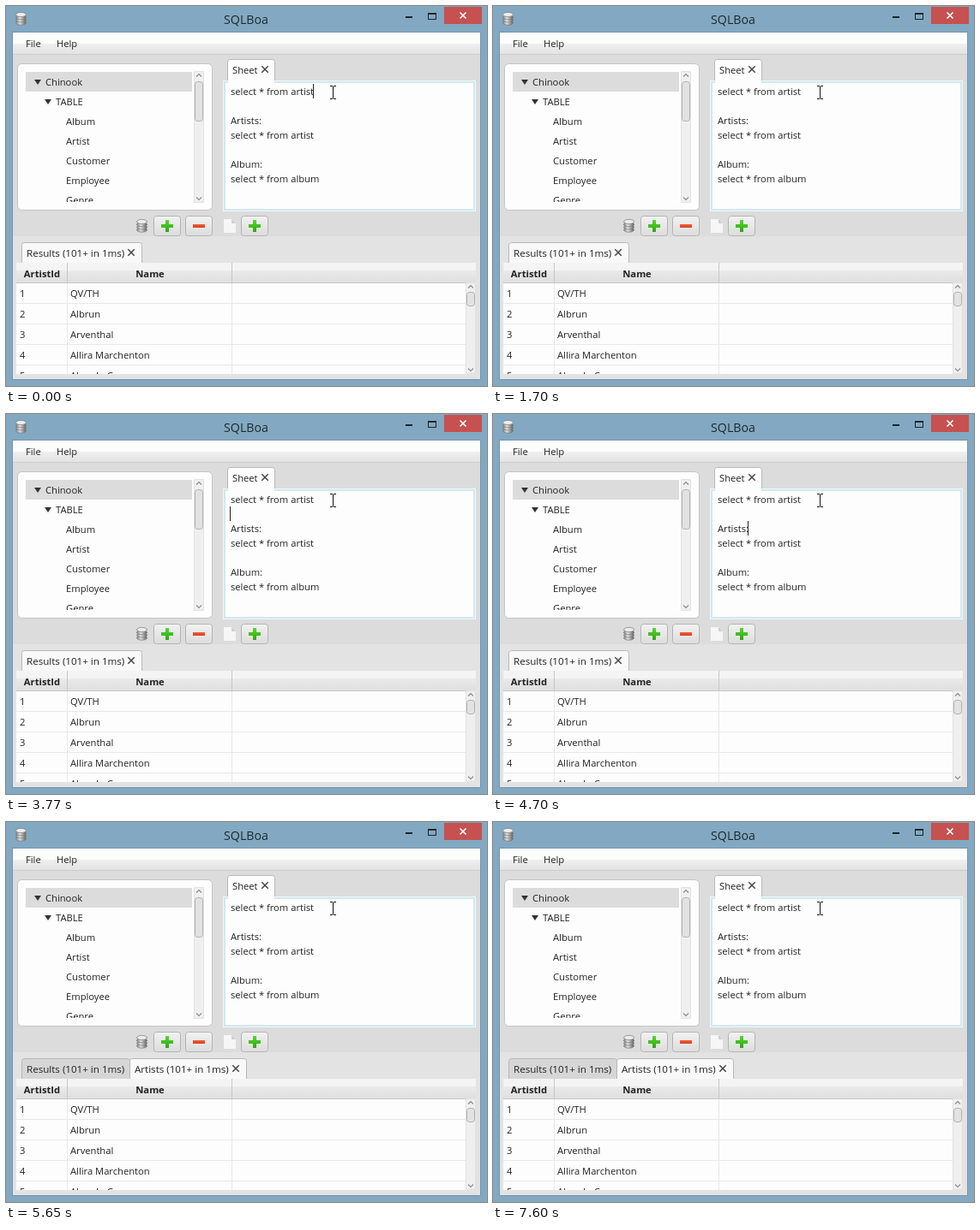
These frames come from a looping animation (561 px wide and 444 px high, 8000 ms). An HTML page with a canvas:

```html
<!DOCTYPE html>
<html lang="en">
<head>
<meta charset="utf-8">
<title>SQLBoa</title>
<style>
html, body { margin: 0; width: 100%; height: 100%; overflow: hidden; background: #82a9c1; }
canvas { display: block; }
</style>
</head>
<body>
<canvas id="stage" width="561" height="444"></canvas>
<script>
const ctx = document.getElementById('stage').getContext('2d');
const LOOP = 8000;
const FONT = '"Open Sans", "Noto Sans", sans-serif';
const INK = '#222';
const FRAME = '#82a9c1';

// Caret visibility: [start, end, x, line]
const carets = [
  [0, 280, 358, 0], [680, 1000, 358, 0], [1140, 1700, 358, 0],
  [2130, 2630, 358, 0], [2750, 3180, 358, 0], [3770, 4170, 261, 1],
  [4700, 5650, 297, 2], [6110, 6360, 358, 3], [6360, 6610, 261, 4],
  [7200, 7600, 298, 5]
];
const BUSY = [1000, 1140];
const TAB_OPENS = 5250, TAB_READY = 5370;

const sheet = ['select * from artist', '', 'Artists:', 'select * from artist', '', 'Album:', 'select * from album'];
const tables = ['Album', 'Artist', 'Customer', 'Employee', 'Genre'];
const artists = ['QV/TH', 'Albrun', 'Arventhal', 'Allira Marchenton', 'Almo In Currens'];

function rect(x, y, w, h, fill) {
  ctx.fillStyle = fill;
  ctx.fillRect(x, y, w, h);
}

function fade(y, h, ...colors) {
  const g = ctx.createLinearGradient(0, y, 0, y + h);
  colors.forEach((c, i) => g.addColorStop(i / (colors.length - 1), c));
  return g;
}

function panel(x, y, w, h, radii, fill, border) {
  ctx.beginPath();
  ctx.roundRect(x + .5, y + .5, w - 1, h - 1, radii);
  ctx.fillStyle = fill;
  ctx.fill();
  ctx.strokeStyle = border;
  ctx.lineWidth = 1;
  ctx.stroke();
}

function text(s, x, y, { size = 11.2, weight = 400, align = 'left', color = INK } = {}) {
  ctx.font = `${weight} ${size}px ${FONT}`;
  ctx.textAlign = align;
  ctx.fillStyle = color;
  ctx.fillText(s, x, y);
}

function path(points, color, width) {
  ctx.beginPath();
  points.forEach(([x, y]) => ctx.lineTo(x, y));
  if (width) {
    ctx.strokeStyle = color;
    ctx.lineWidth = width;
    ctx.stroke();
  } else {
    ctx.fillStyle = color;
    ctx.fill();
  }
}

function cross(x, y, r, color, width) {
  path([[x - r, y - r], [x + r, y + r]], color, width);
  path([[x + r, y - r], [x - r, y + r]], color, width);
}

function clipped(x, y, w, h, draw) {
  ctx.save();
  ctx.beginPath();
  ctx.rect(x, y, w, h);
  ctx.clip();
  draw();
  ctx.restore();
}

function chevron(x, y, dir) {
  path([[x - 3, y + 1.5 * dir], [x, y - 1.5 * dir], [x + 3, y + 1.5 * dir]], '#8c8c8c', 1.1);
}

function scrollbar(x, y, h, thumbY, thumbH) {
  panel(x, y, 12, h, 0, '#efefef', '#e2e2e2');
  chevron(x + 6, y + 5, 1);
  chevron(x + 6, y + h - 5, -1);
  panel(x + 1, thumbY, 10, thumbH, 3, '#e2e2e2', '#b0b0b0');
}

function database(x, y) {
  const g = ctx.createLinearGradient(x, 0, x + 13, 0);
  g.addColorStop(0, '#777');
  g.addColorStop(.4, '#e4e4e4');
  g.addColorStop(1, '#555');
  for (let i = 3; i >= 0; i--) {
    ctx.beginPath();
    ctx.ellipse(x + 6.5, y + 3 + i * 3.2, 6, 2.6, 0, 0, Math.PI * 2);
    ctx.fillStyle = i ? g : '#ececec';
    ctx.fill();
    ctx.strokeStyle = '#777';
    ctx.lineWidth = .7;
    ctx.stroke();
  }
}

function button(x, plus) {
  panel(x, 245, 32, 24, 3, fade(245, 24, '#f2f2f2', '#dcdcdc'), '#b4b4b4');
  if (plus) {
    const green = fade(250, 14, '#55d634', '#2ea80e');
    rect(x + 9, 255, 14, 4, green);
    rect(x + 14, 250, 4, 14, green);
  } else {
    rect(x + 9, 255, 14, 4, fade(255, 4, '#f0603c', '#d8401c'));
  }
}

function titleBar() {
  rect(0, 0, 561, 444, FRAME);
  database(11, 7);
  text('SQLBoa', 280, 21, { size: 14.2, align: 'center', color: '#202a30' });
  rect(466, 12, 8, 2, '#1c262c');
  ctx.strokeStyle = '#1c262c';
  ctx.lineWidth = 1;
  ctx.strokeRect(492.5, 8.5, 9, 7);
  rect(492, 8, 10, 2, '#1c262c');
  rect(511, 1, 44, 20, '#c75050');
  cross(533, 11, 3.5, '#fff', 1.6);
}

function menuBar() {
  rect(8, 31, 545, 13, '#fdfdfd');
  rect(8, 44, 545, 13, fade(44, 13, '#efefef', '#e2e2e2'));
  rect(8, 56, 545, 1, '#cecece');
  text('File', 23, 48);
  text('Help', 59, 48);
}

function tree() {
  panel(13, 67, 228, 172, 5, '#fdfdfd', '#c4c4c4');
  rect(23, 77, 194, 23, '#dcdcdc');
  clipped(23, 77, 194, 152, () => {
    path([[33, 86], [41, 86], [37, 92]], '#333');
    text('Chinook', 46, 93);
    path([[45, 109], [53, 109], [49, 115]], '#333');
    text('TABLE', 58, 116);
    tables.forEach((name, i) => text(name, 70, 139 + i * 23));
  });
  scrollbar(219, 76, 154, 88, 47);
}

function editor() {
  panel(258, 62, 56, 27, [3, 3, 0, 0], '#fdfdfd', '#b8b8b8');
  text('Sheet', 264, 79);
  cross(302, 74, 3.7, '#444', 1.5);
  rect(253, 87, 295, 153, '#f0f7fa');
  rect(254, 88, 293, 151, '#d2e8f1');
  rect(256, 90, 289, 147, '#fdfdfd');
  rect(259, 87, 54, 3, '#fdfdfd');
  sheet.forEach((line, i) => text(line, 262, 104 + i * 17));
}

function toolbar() {
  database(152, 249);
  button(172, true);
  button(209, false);
  path([[254, 249], [263, 249], [268, 254], [268, 265], [254, 265]], '#f6f6f6');
  path([[263, 249], [263, 254], [268, 254]], '#cfcfcf');
  button(274, true);
}

function resultTab(x, w, label, selected, textX, closeX) {
  panel(x, 276, w, 25, [3, 3, 0, 0], selected ? '#f9f9f9' : '#d6d6d6', '#b8b8b8');
  clipped(x + 1, 276, w - 2, 24, () => {
    text(label, textX, 293, { size: 11.6 });
    if (closeX) cross(closeX, 288, 3.7, '#444', 1.5);
  });
}

function results(t) {
  const opened = t >= TAB_OPENS, ready = t >= TAB_READY;
  resultTab(18, opened ? 127 : 141, 'Results (101+ in 1ms)', !opened, 24, opened ? 0 : 146);
  if (opened) resultTab(144, ready ? 137 : 108, 'Artists (101+ in 1ms)', true, ready ? 150 : 138, ready ? 268 : 0);

  rect(12, 300, 536, 130, '#fdfdfd');
  rect(12, 300, 536, 9, '#f4f4f4');
  rect(12, 309, 536, 15, fade(309, 15, '#eaeaea', '#dedede'));
  rect(12, 323, 536, 1, '#c6c6c6');
  text('ArtistId', 42, 317, { weight: 700, align: 'center' });
  text('Name', 168, 317, { weight: 700, align: 'center' });
  clipped(12, 324, 524, 106, () => {
    artists.forEach((name, i) => {
      const y = 324 + i * 24;
      text(i + 1, 16, y + 16);
      text(name, 75, y + 16);
      rect(12, y + 23, 524, 1, '#e8e8e8');
    });
  });
  for (const x of [71, 263]) {
    rect(x, 300, 1, 24, '#c6c6c6');
    rect(x, 324, 1, 106, '#e8e8e8');
  }
  scrollbar(536, 323, 107, 334, 17);
}

function pointer(t) {
  if (t >= BUSY[0] && t < BUSY[1]) {
    ctx.beginPath();
    ctx.arc(381, 101, 7.5, 0, Math.PI * 2);
    ctx.strokeStyle = '#4fb3dc';
    ctx.lineWidth = 4.5;
    ctx.stroke();
    return;
  }
  rect(381, 94, 1, 14, '#111');
  for (const y of [93, 108]) {
    rect(378, y, 3, 1, '#111');
    rect(382, y, 3, 1, '#111');
  }
}

function draw(t) {
  titleBar();
  rect(7, 30, 547, 407, '#7396ab');
  rect(8, 31, 545, 405, '#dcdcdc');
  rect(8, 269, 545, 167, '#e3e3e3');
  menuBar();
  tree();
  editor();
  toolbar();
  results(t);
  for (const [start, end, x, line] of carets) {
    if (t >= start && t < end) rect(x, 91 + line * 17, 1, 17, '#222');
  }
  pointer(t);
}

function tick(now) {
  draw(now % LOOP);
  requestAnimationFrame(tick);
}
draw(0);
requestAnimationFrame(tick);
</script>
</body>
</html>
```
